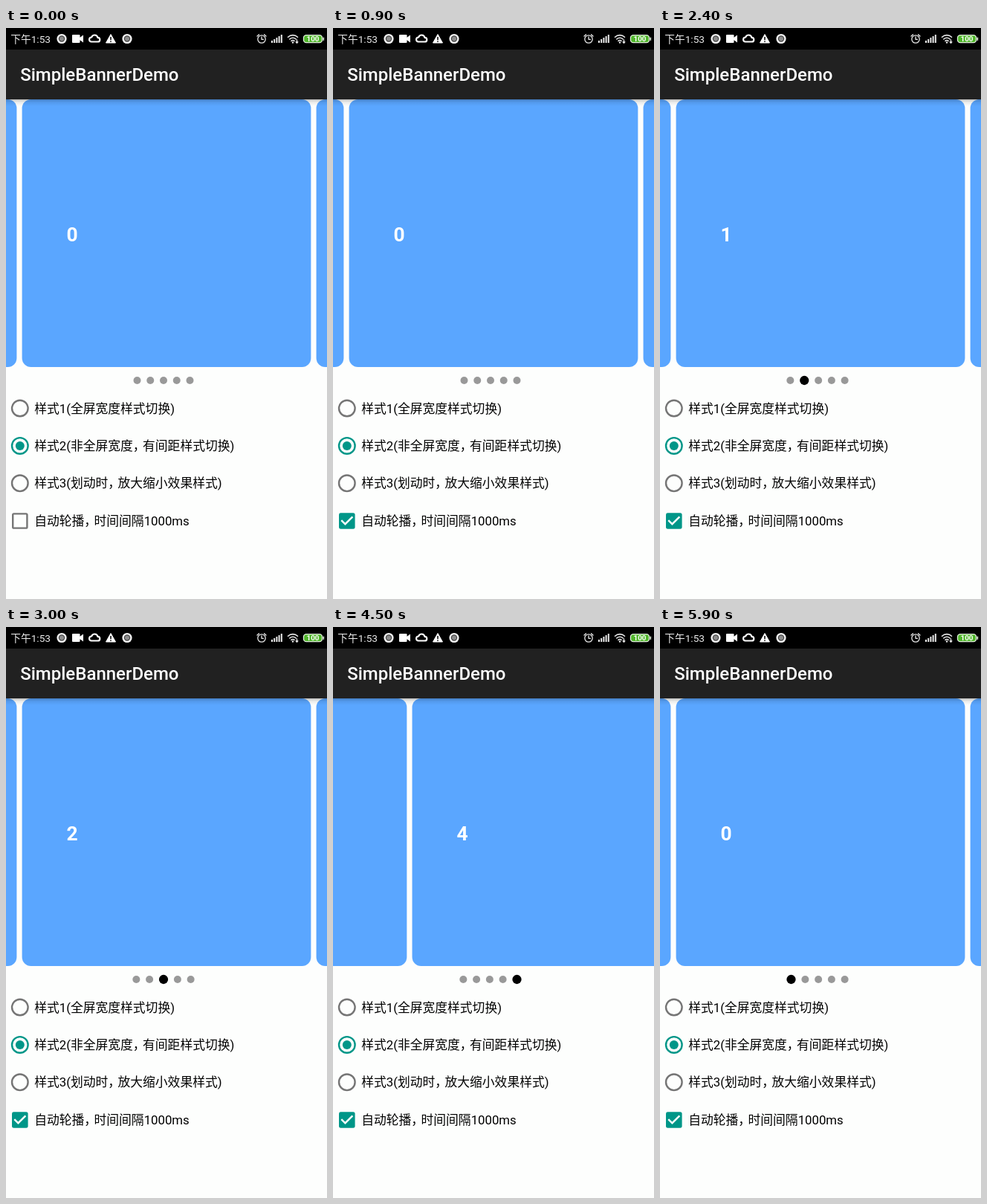
Write an HTML page that moves like this. It is 432 px wide and 768 px high and loops after 6.1 s.

```html
<!DOCTYPE html>
<html lang="zh-CN">
<head>
<meta charset="utf-8">
<title>Banner demo</title>
<style>
  html, body { margin: 0; width: 100%; height: 100%; overflow: hidden; background: #fdfefd; }
  svg { display: block; width: 432px; height: 768px; }
  text { font-family: Roboto, "Noto Sans CJK SC", "Noto Sans CJK", sans-serif; }
  .label { font-size: 16.8px; fill: #000; }
  .digit { font-size: 26.4px; font-weight: 700; fill: #fff; }
  .line { fill: none; stroke: #e8e8e8; stroke-width: 1.6; stroke-linecap: round; stroke-linejoin: round; }
  .thin { stroke-width: 1.3; }
  .bold { stroke: #fff; stroke-width: 2.2; }
</style>
</head>
<body>
<svg viewBox="0 0 432 768">
  <defs>
    <linearGradient id="shade" x1="0" y1="0" x2="0" y2="1">
      <stop offset="0" stop-color="#000" stop-opacity=".24"/>
      <stop offset=".4" stop-color="#000" stop-opacity=".08"/>
      <stop offset="1" stop-color="#000" stop-opacity="0"/>
    </linearGradient>
    <g id="record">
      <circle r="6.6" fill="#f4f4f4"/>
      <circle r="4.2" fill="#444"/>
      <circle r="3" fill="#8c8c8c"/>
    </g>
  </defs>
  <rect width="432" height="768" fill="#fdfefd"/>
  <g id="strip"></g>
  <rect y="96" width="432" height="9" fill="url(#shade)"/>

  <rect y="29" width="432" height="67" fill="#212121"/>
  <text x="19.2" y="71.3" font-size="24" font-weight="500" fill="#fff">SimpleBannerDemo</text>

  <rect width="432" height="29" fill="#000"/>
  <text x="6.3" y="19.800" font-size="13.700" fill="#ececec">下午1:53</text>
  <use href="#record" x="75" y="14.500"/>
  <path d="M90 9h8.500q1 0 1 1v2.800l4.500-3.300v10l-4.500-3.300v2.800q0 1-1 1h-8.500q-1 0-1-1v-9q0-1 1-1z" fill="#fff"/>
  <path class="line bold" d="M115 18.500h8.500a2.800 2.800 0 0 0 0-5.600 4.300 4.300 0 0 0-8.300-.4 3 3 0 0 0-.2 6z"/>
  <path d="M141 8.500l6.500 11.500h-13z" fill="#fff" stroke="#fff" stroke-linejoin="round"/>
  <path d="M141 12v4.300M141 17.500v1.500" stroke="#000" stroke-width="1.500"/>
  <use href="#record" x="163" y="14.500"/>
  <g class="line thin">
    <circle cx="344" cy="15" r="5.200"/>
    <path d="M338 11l2.500-2.300M350 11l-2.500-2.300M344 12v3.300h2.500"/>
  </g>
  <g id="signal" fill="#e8e8e8"></g>
  <path class="line" d="M379.500 12.300a9.300 9.300 0 0 1 13 0M381.800 15a6 6 0 0 1 8.400 0M384 17.400a3 3 0 0 1 4 0"/>
  <circle cx="386" cy="19.500" r="1.200" fill="#e8e8e8"/>
  <path class="line thin" d="M391.500 16v4m-1.300-1.300l1.300 1.500 1.300-1.500"/>
  <rect x="400.500" y="9.700" width="25" height="10" rx="3.600" fill="#4fb52a" stroke="#e4efdf" stroke-width="1.300"/>
  <rect x="426.500" y="12.500" width="1.600" height="4.500" rx=".8" fill="#e4efdf"/>
  <text x="413" y="18.200" font-size="9.800" font-weight="700" fill="#fff" text-anchor="middle">100</text>

  <g id="dots"></g>
  <g id="options"></g>
  <rect id="box" x="9.200" y="653.400" width="19.200" height="19.200" rx="1.400" fill="none" stroke="#757575" stroke-width="2.400"/>
  <g id="tick">
    <rect x="8" y="652.200" width="21.600" height="21.600" rx="2.400" fill="#009688"/>
    <path transform="translate(4.400 648.600) scale(1.200)" d="M10 17l-5-5 1.410-1.410L10 14.170l7.590-7.590L19 8z" fill="#fff"/>
  </g>
</svg>
<script>
  const LOOP = 6100, TICK = 100, STEP = 396, PAGES = 5;
  const CHECK_AT = 447, SLIDE_AT = [1447, 2447, 3447, 4447, 5447], SLIDE_MS = 200;
  const $ = id => document.getElementById(id);

  function add(parent, tag, attrs, text) {
    const el = document.createElementNS('http://www.w3.org/2000/svg', tag);
    for (const k in attrs) el.setAttribute(k, attrs[k]);
    if (text) el.textContent = text;
    parent.appendChild(el);
    return el;
  }

  for (let i = -1; i <= PAGES + 1; i++) {
    const x = 21.6 + STEP * i;
    add($('strip'), 'rect', { x, y: 96, width: 388.8, height: 360, rx: 12, fill: '#5aa6ff' });
    add($('strip'), 'text', { x: x + 60, y: 286.6, class: 'digit' }, String((i + PAGES) % PAGES));
  }

  for (let i = 0; i < 5; i++) {
    const h = 3 + 2 * i;
    add($('signal'), 'rect', { x: 357 + 3.2 * i, y: 20 - h, width: 2, height: h });
  }

  // The full-width comma is set a little tighter than its em box.
  const COMMA = '\uff0c';
  function label(y, head, tail) {
    const el = add($('options'), 'text', { x: 38.2, y, class: 'label' });
    add(el, 'tspan', {}, tail ? head + COMMA : head);
    if (tail) add(el, 'tspan', { dx: -3.6 }, tail);
  }

  [['样式1(全屏宽度样式切换)'], ['样式2(非全屏宽度', '有间距样式切换)'], ['样式3(划动时', '放大缩小效果样式)']]
    .forEach((parts, i) => {
      const cy = 511.5 + 50.4 * i, on = i === 1, color = on ? '#009688' : '#757575';
      add($('options'), 'circle', { cx: 18.8, cy, r: 10.8, fill: 'none', stroke: color, 'stroke-width': 2.4 });
      if (on) add($('options'), 'circle', { cx: 18.8, cy, r: 6, fill: color });
      label(cy + 6, ...parts);
    });
  label(669, '自动轮播', '时间间隔1000ms');

  const dots = Array.from({ length: PAGES }, () => add($('dots'), 'circle', { cy: 474 }));

  function layDots(active) {
    const size = i => i === active ? 12.3 : 10;
    const gap = 7.75;
    let x = 212 - (dots.reduce((sum, _, i) => sum + size(i), 0) + gap * (PAGES - 1)) / 2;
    dots.forEach((dot, i) => {
      const d = size(i);
      dot.setAttribute('cx', x + d / 2);
      dot.setAttribute('r', d / 2);
      dot.setAttribute('fill', i === active ? '#000' : '#999');
      x += d + gap;
    });
  }

  const ease = p => 1 - Math.pow(1 - p, 5);
  const progress = (t, from) => ease(Math.min(1, Math.max(0, (t - from) / SLIDE_MS)));

  function draw(t) {
    const page = SLIDE_AT.reduce((sum, from) => sum + progress(t, from), 0);
    const turns = SLIDE_AT.filter(from => t >= from).length;
    $('strip').setAttribute('transform', `translate(${-STEP * page} 0)`);
    layDots(turns ? turns % PAGES : -1);
    const checked = t >= CHECK_AT;
    $('box').style.display = checked ? 'none' : '';
    $('tick').style.display = checked ? '' : 'none';
  }

  const start = performance.now();
  function frame() {
    const t = Math.max(0, performance.now() - start) % LOOP;
    draw(Math.floor(t / TICK) * TICK);
    requestAnimationFrame(frame);
  }
  frame();
</script>
</body>
</html>
```
